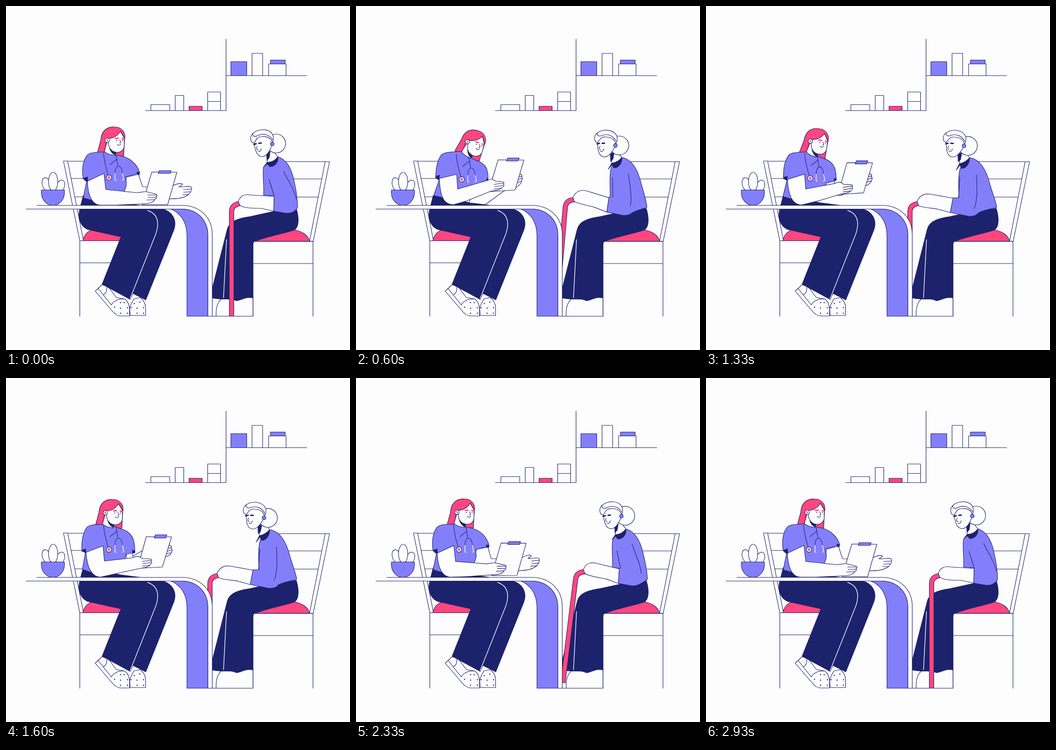
An HTML page for the animation above (2990 ms loop, 748 by 748 pixels).

```html
<!DOCTYPE html>
<html lang="en">
<head>
<meta charset="utf-8">
<title>Consultation</title>
<style>
  html, body { margin: 0; width: 100%; height: 100%; overflow: hidden; background: #fdfdfd; }
  svg { display: block; width: 100%; height: 100%; fill: #fdfdfd; stroke: #1f216e; stroke-width: 1.15; stroke-linejoin: round; stroke-linecap: round; }
  .violet { fill: #837ffb; }
  .pink { fill: #ff467f; }
  .navy { fill: #1c226c; }
  .line { fill: none; }
  .bare { stroke: none; }
  .white { fill: none; stroke: #fdfdfd; stroke-width: 1.4; }
  .lid { fill: none; stroke: #ff467f; stroke-width: 3; }
</style>
</head>
<body>
<svg viewBox="0 0 748 748">
  <!-- shelves -->
  <path class="line" d="M478.5 72V227.5H303M478.5 151.5H654"/>
  <path class="violet" d="M489 121H523.5V151.5H489ZM575 117.5H607V126H575Z"/>
  <path d="M535 103H558V151.5H535ZM571 126H609V151.5H571ZM315 214.5H356V227.5H315ZM368 194.5H386.5V227.5H368ZM438.5 187H466.5V227.5H438.5ZM438.5 207.5H466.5"/>
  <path class="pink" d="M398 218H426.5V227.5H398Z"/>

  <!-- plant -->
  <ellipse cx="88" cy="388" rx="9" ry="15" transform="rotate(-17 88 388)"/>
  <ellipse cx="118" cy="392" rx="9" ry="14" transform="rotate(22 118 392)"/>
  <ellipse cx="102.500" cy="382" rx="10" ry="20.500"/>
  <path class="violet" d="M77 400H127C129 420 117 433.500 102 433.500C87 433.500 75 420 77 400Z"/>

  <!-- chairs -->
  <path class="line" d="M134 337.500H190M142 375H190M150 415H190M160.500 510.500V674.500M160.500 558.500H240"/>
  <path d="M125 337H134L168.500 510.500H160.500Z"/>
  <path class="pink" d="M167 510.500C170 496 178 488 192 486L255 495V510.500Z"/>
  <path class="line" d="M160.500 510.500H255M592 338.500H694M600 376H687M605 415.500H679M537 512H668M537 512V674.500M667.500 512V674.500M537 560H667.500"/>
  <path d="M694 338.500H703.500L668 511.500H660Z"/>
  <path class="pink" d="M538 511.500C560 500 600 488 626 487C645 489 658 500 660 511.500Z"/>

  <!-- patient -->
  <path d="M457 674.500C456 655 460 640 474 634H537V674.500Z"/>
  <path class="navy" d="M631 440C637 458 638 481 627 487C608 494 572 500 540 512Q537 514 537 520V635C525 630 512 640 501 641C490 634 472 640 449 635V612L480 490C483 472 495 463 530 458L585 446Z"/>
  <path class="white" d="M479.500 508L473 634"/>
  <path id="top" class="violet"/>
  <path id="folds" class="line"/>
  <path id="neck"/>
  <path id="neckShade" class="navy bare"/>
  <path id="collar" class="navy"/>
  <g id="patientHead">
    <circle cx="587.500" cy="299" r="20.500"/>
    <path d="M539 292C541 312 545 327 556 327.500C565 328 571 320 577 306L580 285L550 276Z"/>
    <path d="M540 298C531 298 529 284 537 277C549 265 576 266 581 283C582 290 581 294 579 296C577 288 569 283 556 284C547 284 544 290 540 298Z"/>
    <path class="line" d="M537 277C535 283 541 286 549 281C560 276 573 280 580 291M546 305Q543 311 548 313M548 316Q554 318 555 310"/>
    <path class="line" stroke-width="3" d="M539 301L544 299.500M550 298.500L555 298"/>
    <circle class="violet" cx="579" cy="300" r="4"/>
  </g>
  <g id="cane">
    <path class="line" stroke-width="11" stroke-linecap="butt" d="M490.500 675V447Q491 431 511 429"/>
    <path class="line" style="stroke:#ff467f;stroke-width:8.800" stroke-linecap="butt" d="M490.500 674V447Q491 431 510 429"/>
  </g>
  <path id="patientArm"/>

  <!-- doctor -->
  <path d="M209 606L194 620L230 662C236 670 242 674 250 674H268.500C269.500 655 268 644 258 637L240 634L222 610Z"/>
  <path class="line" d="M200 614L229 650C234 641 244 637 256 637M219 612Q220 624 212 628"/>
  <path d="M270 673H303.500V655C303 645 298 639 292 634L278 637C274 645 270 650 269 658Z"/>
  <path class="line" stroke-width="2.700" d="M249 645h0M257 645h0M236 655h0M249 657h0M264 656h0M249 668h0M264 668h0M279 647h0M291 644h0M272 656h0M285 657h0M299 656h0M285 668h0M299 668h0"/>
  <path class="navy" d="M168 412L250 428L296 434L338 441C360 445 373 464 365 487L304 639L276 625L270 638L209 605L250 502L182 487C165 483 155 466 160 443Z"/>
  <path class="white" d="M308 444.500C330 452 334 470 326 495L270 636"/>
  <path class="pink" data-head d="M236 263C216 262 207 275 206 292L199 318L214 320L245 327L256 326L257 300L258 290C261 275 252 263 236 263Z"/>
  <path id="farArm"/>
  <path id="farFingers" class="line"/>
  <path id="scrubs" class="violet"/>
  <path id="sleeveShade" class="navy bare"/>
  <g data-head>
    <path class="bare" d="M221 296L214 317Q224 324 237 325L241 316Z"/>
    <path class="line" d="M218 297L214 317Q224 324 237 325"/>
    <path class="navy bare" d="M224 308Q231 318 240 318L238 325Q228 321 224 308Z"/>
    <path d="M222 288L248 271L257 287V305C256 314 249 319 240 318C231 317 224 310 223 300Z"/>
    <path class="pink bare" d="M214 290C213 272 225 264 238 264C251 264 259 272 258 289C257 284 252 279 249 272C243 282 234 288 222 288Z"/>
    <path class="line" d="M222 288C234 288 243 282 249 272C252 279 257 284 258 289"/>
    <circle cx="220" cy="292" r="4.800"/>
    <path class="line" d="M218 291Q221 290 221 294M247 291Q252 297 247 298M242 301Q246 305 250 300"/>
    <path class="lid" d="M238 288L244 287.500M252.500 288.500L257 289"/>
    <path class="line" stroke-width="2.200" d="M240.500 292.500h0M253 292.500h0"/>
  </g>
  <g id="scope">
    <path class="line" d="M212 319C214 342 218 354 222 367M239 324L241 333L226 345M240 327L243 347M237 364C237 343 252 343 253 364"/>
    <path class="white" d="M237 364L237 378L241 380M253 364L256 377L251 380"/>
    <path class="lid" style="stroke-width:1.600" d="M240 380h2M250 380h2"/>
    <circle cx="224" cy="373" r="5.700"/>
    <circle class="pink bare" cx="224" cy="373" r="2.800"/>
  </g>
  <path id="board"/>
  <path id="clip" class="violet"/>
  <path id="nearArm"/>
  <path id="fingers" class="line"/>

  <!-- table -->
  <path class="violet" d="M358 441.500H383C415 441.500 439 465 439 498V674.500H393.500V498C393 470 380 450 358 441.500Z"/>
  <path class="bare" d="M43 441.500L67 433.500H383C422 434 448.500 460 448.500 497V674.500H439V498C439 465 415 441.500 383 441.500Z"/>
  <path class="line" d="M67 433.500H383C422 434 448.500 460 448.500 497V674.500M43.500 441.500H383C415 441.500 439 465 439 498V674.500M393.500 674.500H537"/>
</svg>
<script>
const LOOP = 2990;
const TIMES = [0, 600, 1000, 1600, 2000, 2330, 2930];
const $ = id => document.getElementById(id);

// Doctor poses: open hand, reading, holding the board, (far arm) letting go
const doctor = {
  farArm: [
    "M262 372L288 366L297 393L340 394L362 391C372 386 382 384 384 388L376 393C385 395 395 390 402 393C406 397 402 404 398 409C390 416 375 420 355 419L300 420L256 405Z",
    "M262 380L280 378L290 392L320 385L345 372C352 365 360 364 361 369L360 372C362 373 362 375 361 377C361 381 360 384 357 387C352 395 340 398 322 402L281 432L246 428Z",
    "M262 378L276 378L275 388L299 374L340 372C350 362 359 363 360 367L358 370C361 371 362 374 361 376C360 380 358 383 354 386C350 388 345 390 338 392L300 398L262 394Z",
    "M262 376L279 380L273 392L292 386L345 390C352 382 360 378 362 382L360 387C366 383 368 384 367 388C368 394 364 402 358 405C350 410 345 413 330 418L278 434L240 428Z"
  ],
  farFingers: [
    "M386 399L403 398M386 405L401 404M384 410L397 410",
    "M350 372L361 370M350 378L361 375M350 384L360 381",
    "M349 371L360 369M349 377L361 374M349 382L358 380",
    "M352 391L366 386M353 397L367 391M352 403L364 398"
  ],
  scrubs: [
    "M214 317C195 319 182 317 175 326C166 340 165 358 168 376L176 378L168 417L205 428L256 404C262 395 264 385 259 372L291 363C286 345 270 330 250 326L236 323Z",
    "M229 316C205 318 190 317 184 326C175 340 174 356 173 374L181 378L169 412L215 423L255 412C258 405 262 395 262 388L287 378C288 355 282 342 262 336L245 328Z",
    "M211 318C192 319 180 318 174 327C165 342 164 360 165 377L173 378L166 416L200 428L250 405C257 398 260 390 261 383L280 380C281 352 275 335 250 328L236 323Z"
  ],
  sleeveShade: [
    "M168 374L178 371L178 383Q170 381 168 374ZM284 360L291 362L290 368L285 366Z",
    "M173 370L182 367L181 379Q175 377 173 370ZM284 375L287 374L287 378L284 379Z",
    "M165 374L174 371L174 381Q167 379 165 374ZM274 373L281 376L280 381L275 381Z"
  ],
  board: [
    "M317 361L371.5 361.5L351.5 432L296 432Z",
    "M309 334.5L365 335L346 400L288 404Z",
    "M305 345L360 345.5L340 411L286 414Z"
  ],
  clip: [
    "M333 358L359 358L357 364L331 364Z",
    "M330 330.5L355 330.5L352 337L327 337Z",
    "M325 341L350 341L347 348L322 348Z"
  ],
  nearArm: [
    "M177 381L213 364L217 399L285 406C296 405 300 403 306 404L326 409C330 411 329 413 326 414C328 416 328 419 324 420C322 426 312 430 300 430L240 433L205 433C186 432 178 410 177 381Z",
    "M181 375L219 366L221 398L287 379C294 375 298 376 303 381L318 382C322 382 323 385 320 387C323 389 322 393 318 394C316 399 308 401 295 402L240 424L212 432C186 432 183 405 181 375Z",
    "M174 379L211 365L214 398L275 391C284 387 290 386 296 393L312 393C317 393 318 396 315 398C318 400 317 403 314 405C312 410 305 412 292 414L250 423L205 433C184 432 176 408 174 379Z"
  ],
  fingers: [
    "M308 411L327 411M309 416L326 416M306 422L323 421",
    "M300 388L320 385M301 393L320 390M300 398L316 396",
    "M296 399L315 396M297 404L315 401M296 409L312 407"
  ]
};

// Patient poses: upright, leaning to the table
const patient = {
  top: [
    "M592 328C612 335 621 355 626 378C631 400 634 420 634 438C632 443 628 446 622 449C615 451 610 451 605 450L582 446L583 413L560 411C562 390 557 370 560 350L568 340Z",
    "M575 330C600 335 612 365 618 390C624 410 632 430 632 438C615 442 600 445 592 450C588 456 580 458 570 457L531 449L537 417L550 417C549 390 548 370 553 352L560 340Z"
  ],
  folds: [
    "M572 377L583 413M604 360C612 378 628 400 631 420",
    "M552 372L549 417M588 367C590 400 590 425 583 440"
  ],
  neck: [
    "M573 305L591 328Q582 340 568 341L567 322Z",
    "M556 308L573 330Q565 340 552 343L550 325Z"
  ],
  neckShade: [
    "M566 320L575 315L573 330L567 337Z",
    "M547 322L557 318L554 334L548 340Z"
  ],
  collar: [
    "M561 349L568 340C578 340 587 335 591 328C593 340 584 350 573 349L568 343Z",
    "M544 357L551 343C560 341 568 336 573 330C574 343 564 354 556 353L552 346Z"
  ]
};

// Upright, leaning, upright with the hand raised
const forearm = [
  "M583 414L532 411C516 408 509 414 505 425L509 434C520 440 540 440 555 440L582 446Z",
  "M537 418L488 409C474 407 464 413 459 425L462 434C475 440 495 439 505 442L531 449Z",
  "M583 414L532 398C516 394 509 400 505 411L509 420C520 426 540 431 555 434L582 446Z"
];

// Smooth curve through values at TIMES, level at every peak
function curve(...v) {
  const rise = i => (v[i + 1] - v[i]) / (TIMES[i + 1] - TIMES[i]);
  const slope = i => {
    if (i === 0 || i === v.length - 1) return 0;
    const a = rise(i - 1), b = rise(i);
    return a * b <= 0 ? 0 : 2 * a * b / (a + b);
  };
  return t => {
    let i = 0;
    while (i < v.length - 2 && t >= TIMES[i + 1]) i++;
    const span = TIMES[i + 1] - TIMES[i];
    const u = Math.min(1, (t - TIMES[i]) / span), w = 1 - u;
    return v[i] * w * w * (1 + 2 * u) + v[i + 1] * u * u * (3 - 2 * u)
      + span * u * w * (slope(i) * w - slope(i + 1) * u);
  };
}

const dot = (a, b) => a.reduce((sum, x, i) => sum + x * b[i], 0);
const numbers = /\d+(\.\d+)?/g;

function blender(poses) {
  const values = poses.map(p => p.match(numbers).map(Number));
  return weights => {
    let n = 0;
    return poses[0].replace(numbers, () => {
      const k = n++;
      return dot(values.map(v => v[k]), weights).toFixed(2);
    });
  };
}

const makeParts = set => Object.entries(set).map(([id, poses]) =>
  ({ el: $(id), size: poses.length, blend: blender(poses) }));
const doctorParts = makeParts(doctor);
const patientParts = makeParts(patient);
const armShape = blender(forearm);
const heads = document.querySelectorAll("[data-head]");

const open = curve(1, 0, 0, 0, 0, .87, 1);
const read = curve(0, 1, 1, 0, 0, 0, 0);
const hold = curve(0, 0, 0, 1, 0, 0, 0);
const lean = curve(0, .72, 1, 1, .84, .23, 0);
const nod = curve(0, .83, 1, 1, .67, .11, 0);
const lift = curve(0, .6, 0, 0, 1, .6, 0);
const tilt = curve(0, 5, 0, 0, 12, 7, 0);

function draw(t) {
  const o = open(t), r = read(t), h = hold(t);
  const four = [o, r, h, 1 - o - r - h], three = [o, r, 1 - o - r];
  for (const p of doctorParts) p.el.setAttribute("d", p.blend(p.size === 4 ? four : three));
  const headX = dot(four, [0, 22, -4, -4]), headY = dot(four, [0, 3, 1, -1]);
  for (const el of heads)
    el.setAttribute("transform", `translate(${headX} ${headY}) rotate(${15 * r} 220 292)`);
  $("scope").setAttribute("transform", `translate(${6 * r} ${4 * r})`);

  const l = lean(t), n = nod(t), up = lift(t);
  for (const p of patientParts) p.el.setAttribute("d", p.blend([1 - l, l]));
  $("patientArm").setAttribute("d", armShape([1 - l - up, l, up]));
  $("patientHead").setAttribute("transform", `translate(${-18 * n} ${4 * n}) rotate(${8 * n} 579 300)`);
  $("cane").setAttribute("transform", `translate(${-47 * l} ${-13.5 * up}) rotate(${tilt(t)} 509 429)`);
}

function tick() {
  draw(performance.now() % LOOP);
  requestAnimationFrame(tick);
}
tick();
</script>
</body>
</html>
```
